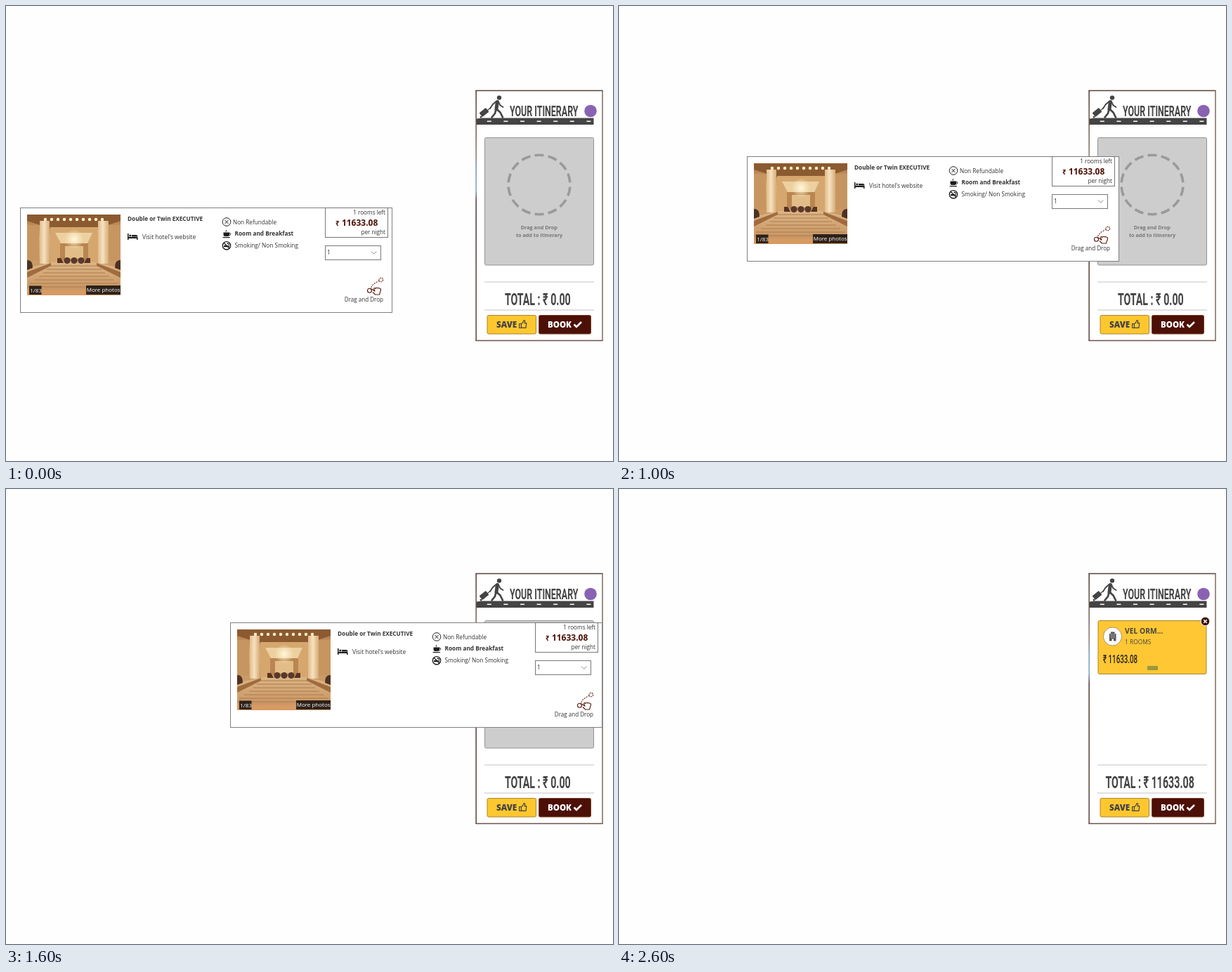
These frames come from a looping animation (864x648 px, 2800 ms). An HTML page:

```html
<!DOCTYPE html>
<html lang="en">
<head>
<meta charset="utf-8">
<title>Drag a room to the itinerary</title>
<style>
  html, body { margin: 0; width: 100%; height: 100%; overflow: hidden; background: #fefefe; }
  svg { display: block; width: 864px; height: 648px; }
  text { font: 8.2px "Open Sans", "Noto Sans", sans-serif; fill: #333; }
  .b { font-weight: 700; }
  .mid { text-anchor: middle; }
  .end { text-anchor: end; }
  .line { fill: none; stroke: #777; }
  .ink { fill: #1c1c1c; }
  .inkline { fill: none; stroke: #1c1c1c; }
  .maroon { fill: none; stroke: #5a1c10; stroke-width: 1.1; }
  .tag { font-size: 8px; fill: #fff; }
  .hint text { font-size: 7.25px; font-weight: 700; fill: #777; }
  .button { font-size: 11.7px; font-weight: 800; }
  /* narrow poster face */
  .narrow { font-family: Roboto, sans-serif; font-weight: 700; fill: #444; transform: scaleX(.592); }
  .total { font-size: 24px; }

  .card, .empty, .filled { animation: 2.8s step-end infinite; }
  .card { animation-name: drag; }
  .empty { animation-name: leave; }
  .filled { opacity: 0; animation-name: arrive; }

  @keyframes drag {
    0% { transform: translate(0, 0); }
    7.1428% { transform: translate(28px, -12px); }
    14.2857% { transform: translate(51px, -29px); }
    21.4285% { transform: translate(85px, -42px); }
    28.5714% { transform: translate(108px, -51px); }
    35.7142% { transform: translate(162px, -73px); }
    42.8571% { transform: translate(191px, -84px); }
    50% { transform: translate(229px, -89px); }
    57.1428% { transform: translate(299px, -97px); }
    64.2857% { transform: translate(358px, -101px); }
    71.4285% { transform: translate(440px, -102px); }
    78.5714% { transform: translate(485px, -97px); }
    85.7142% { transform: translate(520px, -91px); opacity: 1; }
    92.8571%, 100% { transform: translate(520px, -91px); opacity: 0; }
  }
  @keyframes leave { 0% { opacity: 1; } 92.8571%, 100% { opacity: 0; } }
  @keyframes arrive { 0% { opacity: 0; } 92.8571%, 100% { opacity: 1; } }
</style>
</head>
<body>
<svg viewBox="0 0 864 648">
  <defs>
    <linearGradient id="edge" x1="0" y1="120" x2="0" y2="477" gradientUnits="userSpaceOnUse">
      <stop offset="0" stop-color="#4d3a32"/>
      <stop offset=".26" stop-color="#8a7468"/>
      <stop offset=".32" stop-color="#6d9cbc"/>
      <stop offset=".4" stop-color="#7ba3bd"/>
      <stop offset=".44" stop-color="#4d3a36"/>
      <stop offset="1" stop-color="#5b443b"/>
    </linearGradient>
    <linearGradient id="wall" x1="0" y1="0" x2="0" y2="1">
      <stop offset="0" stop-color="#a8713f"/>
      <stop offset=".3" stop-color="#d9ae78"/>
      <stop offset=".6" stop-color="#c99a66"/>
      <stop offset="1" stop-color="#bd8350"/>
    </linearGradient>
    <linearGradient id="pillar">
      <stop offset="0" stop-color="#e0bb8a"/>
      <stop offset=".45" stop-color="#f6e2c0"/>
      <stop offset="1" stop-color="#d6ab77"/>
    </linearGradient>
    <linearGradient id="stairs" x1="0" y1="0" x2="0" y2="1">
      <stop offset="0" stop-color="#dcb585"/>
      <stop offset="1" stop-color="#c48f5c"/>
    </linearGradient>
    <radialGradient id="lamp">
      <stop offset="0" stop-color="#fff8de"/>
      <stop offset="1" stop-color="#fff0c8" stop-opacity="0"/>
    </radialGradient>
  </defs>
  <rect width="864" height="648" fill="#fefefe"/>

  <g class="panel">
    <rect x="669" y="120" width="180" height="357" fill="#fff"/>
    <path d="M668.5 120.5H849.5" stroke="#55423a" stroke-width="1.5"/>
    <path d="M849 120V477" stroke="#75604f" stroke-width="1.4"/>
    <path d="M668.5 476.5H849.5" stroke="#6b5248" stroke-width="1.5"/>
    <rect x="668.4" y="120" width="1.5" height="357" fill="url(#edge)"/>

    <path d="M669.5 160.5L678 159.5H836.500V169H669.500Z" fill="#444"/>
    <path d="M670 164.300H836" stroke="#fff" stroke-width="1.4" stroke-dasharray="6 17.6" stroke-dashoffset="8.800"/>
    <!-- traveller with suitcase -->
    <circle cx="702" cy="130.600" r="3.200" fill="#444"/>
    <g fill="none" stroke="#444" stroke-linecap="round" stroke-linejoin="round">
      <path d="M699.300 136.500L698 147" stroke-width="5"/>
      <path d="M698.500 147L703.500 151.500L707 158.500M697.500 147L696 153L691.500 158.500" stroke-width="2.700"/>
      <path d="M701 136.500L703.500 141.500L707.500 144M697.500 136L692.500 140.500L689 146" stroke-width="1.900"/>
      <path d="M689.500 145L685.500 148.500" stroke-width="1.200"/>
    </g>
    <rect x="-6" y="-3.600" width="12" height="7.200" rx="1" transform="translate(680.500 151.500) rotate(-39)" fill="#444"/>
    <circle cx="676" cy="158" r="1.500" fill="#444"/>
    <g transform="translate(717 156.600)"><text class="narrow" font-size="21" style="font-size:21px">YOUR ITINERARY</text></g>
    <circle cx="832" cy="149.500" r="8.800" fill="#8a62b4"/>

    <path d="M681 393H837M681 433H837" stroke="#c3c1c9"/>

    <rect x="685" y="440.500" width="69.500" height="26.500" rx="2" fill="#ffc72f" stroke="#a9842f"/>
    <text class="button" x="698" y="457.600" style="fill:#444">SAVE</text>
    <path d="M730.600 452.500H733.300V458.500H730.600ZM733.300 453L736 450.300L737.200 447.600Q739 447.400 738.600 450L738 451.700H740.800L740 458.300H734.600L733.300 457.600"
      fill="none" stroke="#444" stroke-width="1.200" stroke-linejoin="round"/>
    <rect x="758.500" y="440.500" width="74" height="26.500" rx="2" fill="#4c1006" stroke="#7b3c22"/>
    <text class="button" x="771" y="457.600" style="fill:#fff;font-size:11.500px">BOOK</text>
    <path d="M808.500 453.500L812 457L819 450" fill="none" stroke="#fff" stroke-width="2.600"/>

    <g class="empty">
      <rect x="681.500" y="187.500" width="155" height="181.500" rx="2" fill="#cdcdcd" stroke="#929292"/>
      <ellipse cx="759" cy="254.500" rx="44" ry="42.300" fill="none" stroke="#9a9a9a" stroke-width="3.600"
        pathLength="280" stroke-dasharray="13.500 6.500" stroke-dashoffset="-3.250"/>
      <g class="hint">
        <text class="mid" x="758.700" y="318">Drag and Drop</text>
        <text class="mid" x="759" y="328.800">to add to Itinerary</text>
      </g>
      <g transform="translate(710 425.700)"><text class="narrow total">TOTAL : ₹ 0.00</text></g>
    </g>

    <g class="filled">
      <rect x="682" y="187.500" width="154" height="76" rx="2" fill="#ffc733" stroke="#a88531"/>
      <circle cx="702.500" cy="210" r="13" fill="#fff" stroke="#a9926b"/>
      <path d="M698 216.500V206H700V203.500H705.500V206H707.500V216.500H704V213.500H701.500V216.500Z" fill="#555"/>
      <path d="M700.500 206V213M702.800 206V212M705 206V213" stroke="#fff" stroke-width=".8" stroke-dasharray="1.300 1"/>
      <text class="b" x="720" y="206.200" style="font-size:10.300px;fill:#444">VEL ORM...</text>
      <text x="720" y="221.300" style="font-size:8.400px;fill:#444">1 ROOMS</text>
      <g transform="translate(689 248)"><text class="narrow" style="font-size:16.500px;font-weight:500;fill:#222">₹ 11633.08</text></g>
      <rect x="752" y="252" width="15" height="6" fill="#979a3d"/>
      <circle cx="834.500" cy="188.500" r="6.300" fill="#38130c" stroke="#fff"/>
      <path d="M832.300 186.300L836.700 190.700M836.700 186.300L832.300 190.700" stroke="#fff" stroke-width="1.600"/>
      <g transform="translate(692.500 425.700)"><text class="narrow total">TOTAL : ₹ 11633.08</text></g>
    </g>
  </g>

  <g class="card">
    <rect x="20.500" y="287.500" width="529" height="149" fill="#fff" stroke="#808080"/>

    <!-- hall -->
    <svg x="30" y="297" width="133" height="115" viewBox="0 0 133 115" style="width:133px;height:115px">
      <rect width="133" height="115" fill="url(#wall)"/>
      <path d="M0 0H133V9L100 20H34L0 9Z" fill="#8c5a30"/>
      <path d="M26 7H108" stroke="#fff0c6" stroke-width="4.500" stroke-dasharray="0 9" stroke-linecap="round"/>
      <rect x="33" y="18" width="68" height="50" fill="#d5a76f"/>
      <path d="M40 26H93L86 41H48Z" fill="#ecd0a0"/>
      <rect x="47" y="41" width="40" height="24" fill="#b98550"/>
      <rect x="54" y="45" width="26" height="18" fill="#e2bd88"/>
      <circle cx="67" cy="35" r="14" fill="url(#lamp)"/>
      <path d="M0 15H17V66H0ZM116 15H133V66H116Z" fill="#c79660"/>
      <rect x="18" y="9" width="14" height="61" fill="url(#pillar)"/>
      <rect x="101" y="9" width="15" height="61" fill="url(#pillar)"/>
      <path d="M0 76L36 68H98L133 76V115H0Z" fill="url(#stairs)"/>
      <path d="M32 73H102M28 78H106M23 83H111M17 88H117M10 93H123M3 98H130M0 103H133" stroke="#a9764a" stroke-width=".9"/>
      <path d="M0 82L34 69V73L0 90ZM133 82L99 69V73L133 90Z" fill="#a06c3e"/>
      <path d="M0 65Q8 64 8 76L0 79ZM133 65Q125 64 125 76L133 79Z" fill="#4e3222"/>
      <path d="M43 62H48L52 69H43ZM90 62H85L81 69H90Z" fill="#583323"/>
      <g fill="#59382b"><circle cx="57" cy="65.500" r="4.600"/><circle cx="67" cy="65.500" r="4.600"/><circle cx="77" cy="65.500" r="4.600"/></g>
      <path d="M0 107H133V115H0Z" fill="#d79a62"/>
    </svg>
    <path d="M33 398.500H50.500V411H33ZM114 398H163V411H114Z" fill="#1d1712" fill-opacity=".9"/>
    <text class="tag" x="34.300" y="407.700">1/83</text>
    <text class="tag" x="114.700" y="407.300">More photos</text>

    <text class="b" x="173" y="305.600">Double or Twin EXECUTIVE</text>
    <path class="ink" d="M173 324H174.500V329H187.500V333H186V331H174.500V333H173ZM179 326H185Q187.500 326 187.500 328.500H179Z"/>
    <circle class="ink" cx="176.800" cy="327" r="1.500"/>
    <text x="194" y="331.800" style="font-size:8.400px">Visit hotel's website</text>

    <circle class="inkline" cx="314" cy="307.500" r="5.800"/>
    <path class="inkline" d="M311.500 305L316.500 310M316.500 305L311.500 310"/>
    <text x="323" y="310.500">Non Refundable</text>
    <path class="ink" d="M309.500 322.500H318V325.500Q318 328 315.500 328H312Q309.500 328 309.500 325.500ZM308 329H319.500L318 330.300H309.500Z"/>
    <path class="inkline" d="M318 323.500Q320.300 323.500 319.700 325.300T317.500 326.500M313.700 321.800Q312.500 320.500 313.700 319"/>
    <text class="b" x="325.500" y="327.400" style="font-size:8.250px">Room and Breakfast</text>
    <circle class="inkline" cx="314" cy="341.300" r="5.700" stroke-width="1.300"/>
    <path class="ink" d="M310 341H316V343.300H310ZM316.600 341H318V343.300H316.600Z"/>
    <path class="inkline" d="M310 337.300L318 345.300M314.500 338.300Q317.500 338 317.500 340.500" stroke-width="1.300"/>
    <text x="325.500" y="344.400" style="font-size:8.300px">Smoking/ Non Smoking</text>

    <rect class="line" x="454.500" y="287.500" width="89" height="42"/>
    <text class="end" x="540" y="297.400">1 rooms left</text>
    <text class="b end" x="529.300" y="313" style="font-size:12px;fill:#4c1006">11633.08</text>
    <text class="b" x="469" y="312.800" style="font-size:10px;fill:#4c1006">₹</text>
    <text class="end" x="540" y="325">per night</text>

    <rect class="line" x="454.500" y="341.500" width="79" height="20"/>
    <text x="457" y="354.400">1</text>
    <path d="M520 349.500L523.700 353.200L527.400 349.500" fill="none" stroke="#888"/>

    <circle class="maroon" cx="517.500" cy="405.300" r="3"/>
    <circle class="maroon" cx="533.800" cy="390" r="2.800" stroke-dasharray="1.800 1"/>
    <path class="maroon" d="M519.500 401L523 396L531 391" stroke-dasharray="2 1.500"/>
    <path class="maroon" d="M518.500 403.500Q519.500 402 521 403.500L525 406.200L523.500 402.500Q524.500 400.800 526 402.300Q527.500 400.500 529 402Q530.500 400.800 531.700 402.300Q533.700 402 533.500 404.500L531.500 411H525.500L522 407.500" stroke-linejoin="round"/>
    <text class="end" x="537" y="421.200" style="font-size:8.050px">Drag and Drop</text>
  </g>
</svg>
</body>
</html>
```
